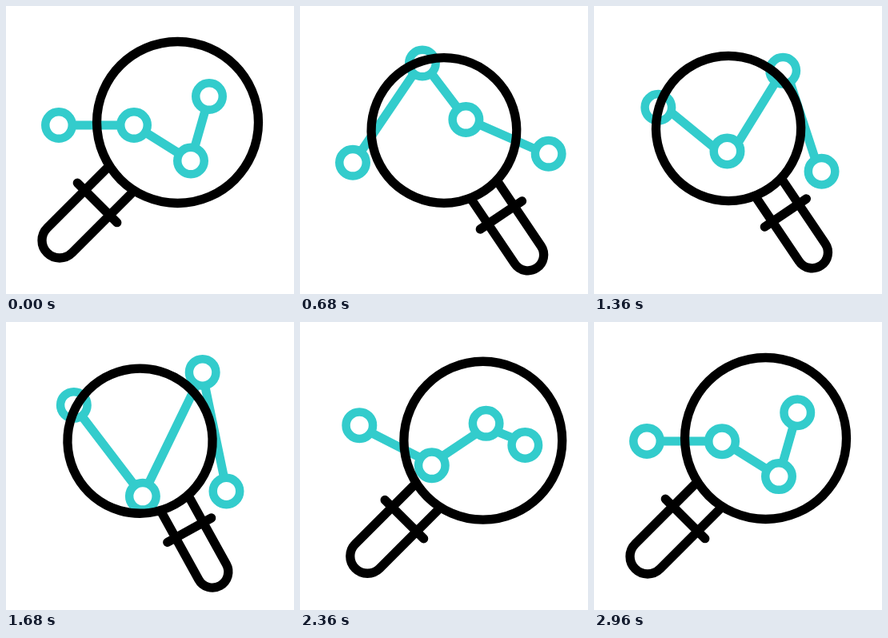
Recreate the animation shown at these times as an HTML page with a canvas. Size 360 px wide and 360 px high, loop 3 s.

```html
<!DOCTYPE html>
<html lang="en">
<head>
<meta charset="utf-8">
<title>Chart under a magnifier</title>
<style>
  html, body { margin: 0; width: 100%; height: 100%; overflow: hidden; background: #fff; }
  canvas { display: block; width: 360px; height: 360px; }
</style>
</head>
<body>
<canvas id="stage" width="360" height="360"></canvas>
<script>
const ctx = document.getElementById('stage').getContext('2d');
const LOOP = 3000, STEP = 40, LINE_LEAD = 32;

// Key positions of the four chart points
const rest = [[66, 149], [160, 149], [231, 193.5], [254, 113]];
const peak = [[66, 198.5], [152.5, 67], [206, 139], [314, 189]];
const zigzag = [[85, 103.5], [171, 218.5], [246, 62], [275, 212.5]];
const poses = [rest, peak, zigzag, rest];
// Sideways curve of each point's path on the way back to rest
const bend = [[0, 0], [0, 0], [-5, -9.5], [18.5, -2.5]];

// Progress from 0 to 1 between two times: even, and eased at both ends
const span = (t, from, to) => Math.min(1, Math.max(0, (t - from) / (to - from)));
function ease(t, from, to) {
  const u = span(t, from, to);
  return u * u * (3 - 2 * u);
}

function chartPoints(t) {
  const v = ease(t, 80, 780) + ease(t, 940, 1560) + ease(t, 1600, 3000);
  const i = Math.min(2, Math.floor(v)), p = v - i;
  const arc = i === 2 ? 4 * p * (1 - p) : 0;
  return poses[i].map((from, n) => from.map((c, k) =>
    c + (poses[i + 1][n][k] - c) * p + bend[n][k] * arc));
}

// The connecting lines run slightly ahead of the rings
function drawChart(t) {
  ctx.strokeStyle = '#33cccc';
  ctx.lineWidth = 11;
  ctx.lineJoin = 'round';
  ctx.beginPath();
  for (const [x, y] of chartPoints(t + LINE_LEAD)) ctx.lineTo(x, y);
  ctx.stroke();
  ctx.fillStyle = '#fff';
  ctx.lineWidth = 10.5;
  for (const [x, y] of chartPoints(t)) {
    ctx.beginPath();
    ctx.arc(x, y, 16.75, 0, 2 * Math.PI);
    ctx.fill();
    ctx.stroke();
  }
}

function magnifierPose(t) {
  const home = ease(t, 2360, 2780), hop = Math.sin(Math.PI * span(t, 80, 360));
  return {
    turn: 79 * (ease(t, 1600, 2120) - ease(t, 80, 400)),
    size: 1 - 0.103 * (ease(t, 80, 740) - ease(t, 1760, 2600)),
    x: 53 * ease(t, 360, 700) - 28 * ease(t, 80, 360) - 16.5 * ease(t, 940, 1560)
      + 6.5 * ease(t, 1600, 2360) - 15 * home,
    y: 12 * ease(t, 360, 700) - 13 * hop - 4 * ease(t, 940, 1600)
      - 6 * ease(t, 1600, 1900) - 2 * home
  };
}

// Drawn with the handle along +x, around the middle of the whole tool
function drawMagnifier(t) {
  const { turn, size, x, y } = magnifierPose(t);
  ctx.save();
  ctx.translate(180 + x, 180 + y);
  ctx.rotate((135 + turn) * Math.PI / 180);
  ctx.scale(size, size);
  ctx.strokeStyle = '#000';
  ctx.lineWidth = 11.3 / size;
  ctx.lineCap = 'round';
  ctx.beginPath();
  ctx.arc(-48.8, 0, 101, 0, 2 * Math.PI);
  ctx.moveTo(49.8, -22);
  ctx.arc(159.8, 0, 22, -Math.PI / 2, Math.PI / 2);
  ctx.lineTo(49.8, 22);
  ctx.moveTo(93.3, -35);
  ctx.lineTo(93.3, 35);
  ctx.stroke();
  ctx.restore();
}

function draw(now) {
  const t = Math.floor(now % LOOP / STEP) * STEP;
  ctx.fillStyle = '#fff';
  ctx.fillRect(0, 0, 360, 360);
  drawChart(t);
  drawMagnifier(t);
}

const start = performance.now();
function tick(now) {
  draw(Math.max(0, now - start));
  requestAnimationFrame(tick);
}
draw(0);
requestAnimationFrame(tick);
</script>
</body>
</html>
```
